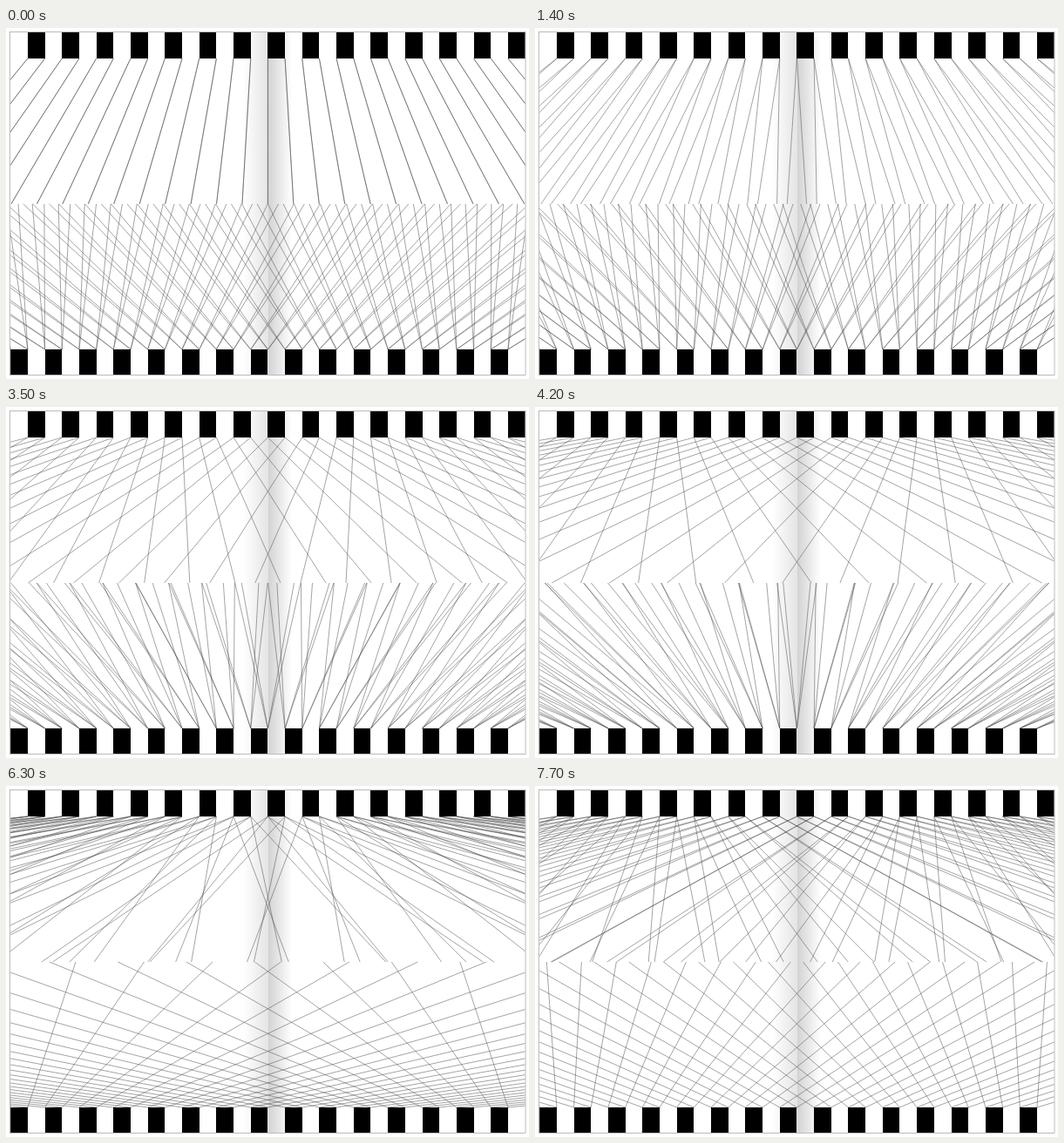
Animation of 600 by 403 pixels, one loop 8 s. Source, as an HTML page with a canvas:

```html
<!DOCTYPE html>
<html lang="en">
<head>
<meta charset="utf-8">
<style>
html, body { margin: 0; height: 100%; overflow: hidden; background: #fff; }
canvas { display: block; }
</style>
</head>
<body>
<canvas id="stage" width="600" height="403"></canvas>
<script>
const ctx = document.getElementById('stage').getContext('2d');
const STEP = 700, LOOP = 8000;
const LEFT = 5.2, CELL = 19.68, MID = LEFT + 15 * CELL, RIGHT = LEFT + 30 * CELL;
const TOP = 35, CENTER = 202, BOTTOM = 369, REACH = CENTER - TOP;
const RADIUS = 295, GAP = 31;

const { sin, cos, PI } = Math;
const turn = (steps, rate = 10.33) => steps * rate * PI / 180;

// Light sources travel on circular arcs and pass from one grating to the other.
// A place is [distance from the axis, height]; below zero it lights the lower grating.
function falling(n) {
  if (n < 8.55) {
    const t = turn(n - 0.2);
    return [RADIUS * (1 - cos(t)), GAP + RADIUS * (1 - sin(t))];
  }
  const t = turn(n - 8.55, 10.75);
  return [RADIUS * cos(t), -GAP - RADIUS * sin(t)];
}

function rising(n, lag) {
  const up = turn(n - 8 - lag);
  if (up >= 0) return [RADIUS * sin(up), GAP + RADIUS * (1 - cos(up))];
  const t = Math.min(0, turn(n - 7.45 - lag));
  return [RADIUS * (1 - cos(t)), RADIUS * sin(t) - GAP];
}

function drawRays([offset, height]) {
  const up = height > 0;
  const ratio = REACH / Math.abs(height);
  const first = up ? -14 : -15;
  const sides = offset > 1e-6 ? [-1, 1] : [1];
  ctx.beginPath();
  for (const side of sides) {
    for (let k = first; k < first + 30; k++) {
      const edge = k * CELL;
      ctx.moveTo(MID + edge, up ? TOP : BOTTOM);
      ctx.lineTo(MID + edge * (1 + ratio) + side * offset * ratio, CENTER);
    }
  }
  ctx.stroke();
}

function shade(x, width, from, to) {
  const fill = ctx.createLinearGradient(x, 0, x + width, 0);
  fill.addColorStop(0, from);
  fill.addColorStop(1, to);
  ctx.fillStyle = fill;
  ctx.fillRect(x, 5, width, 393);
}

function drawGratings() {
  ctx.fillStyle = '#000';
  for (let i = 0; i < 30; i++) {
    const x = Math.round(LEFT + i * CELL);
    const end = Math.round(LEFT + (i + 1) * CELL);
    if (i % 2) ctx.fillRect(x, 5, end - x, 30);
    else ctx.fillRect(x, BOTTOM, end - x, 29);
  }
}

function draw(n) {
  ctx.fillStyle = '#fff';
  ctx.fillRect(0, 0, 600, 403);
  shade(272, 29, '#fff', '#e4e4e4');
  shade(301, 27, '#d3d3d3', '#fff');

  ctx.save();
  ctx.beginPath();
  ctx.rect(LEFT, 5, RIGHT - LEFT, 393);
  ctx.clip();
  ctx.strokeStyle = '#484848';
  ctx.lineWidth = 0.5;
  [falling(n), rising(n, 0), rising(n, 0.5)].forEach(drawRays);
  drawGratings();
  ctx.restore();

  ctx.strokeStyle = '#aaa';
  ctx.lineWidth = 0.8;
  ctx.strokeRect(4.5, 4.5, 591.5, 394);
}

function frame() {
  draw(Math.floor(performance.now() % LOOP / STEP));
  requestAnimationFrame(frame);
}
frame();
</script>
</body>
</html>
```
